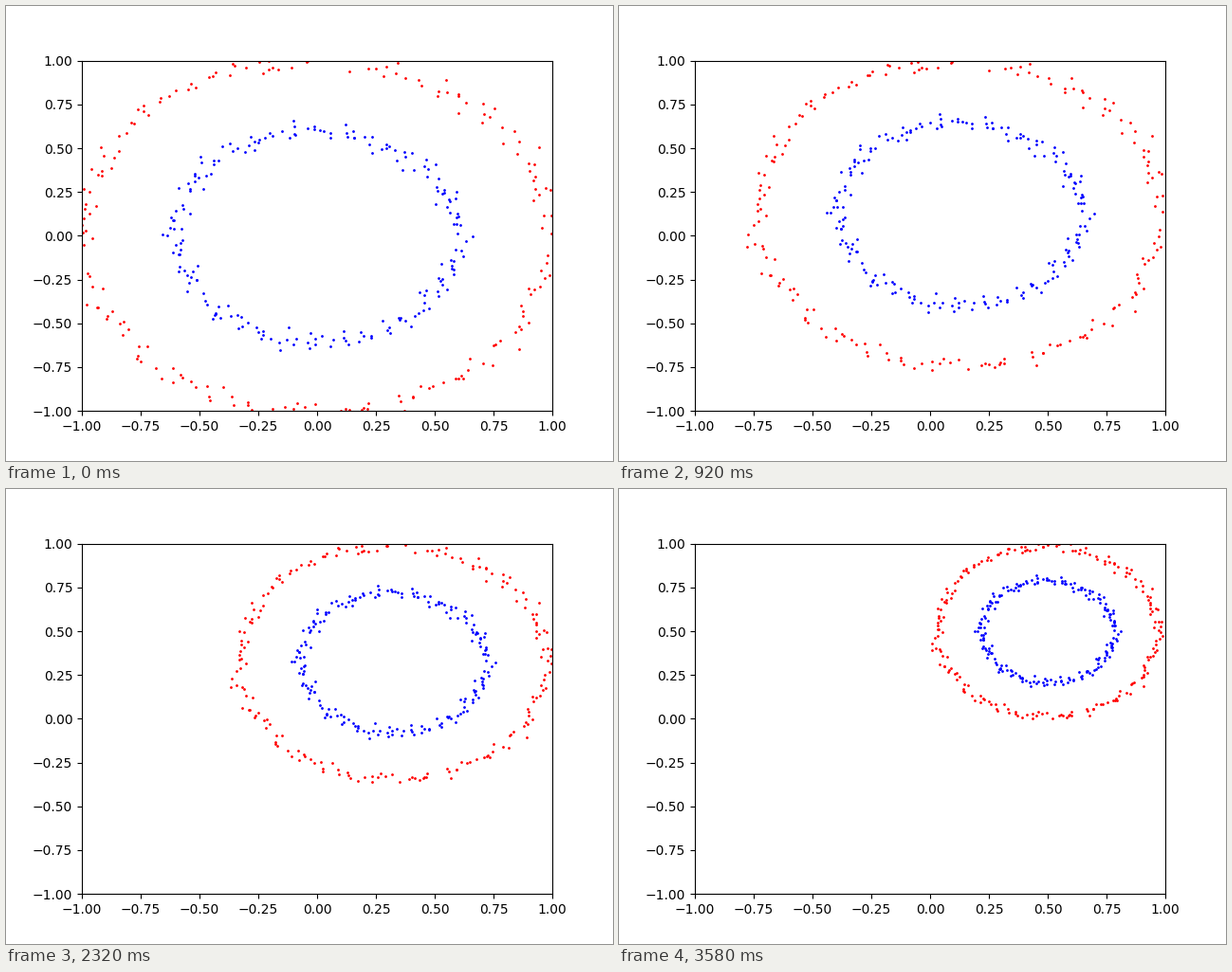
A matplotlib script for the animation above (3600 ms loop, 640 by 480 pixels).

```python
import numpy as np
import matplotlib.pyplot as plt
from matplotlib.animation import FuncAnimation

FRAMES = 180
POINTS = 200
NOISE = 0.03

# Data limits used for the min-max scaling to [0, 1]
LOW = np.array([-1.063, -1.034])
HIGH = np.array([1.060, 1.035])


def circle(radius):
    angle = np.linspace(0, 2 * np.pi, POINTS, endpoint=False)
    return radius * np.column_stack([np.cos(angle), np.sin(angle)])


def make_circles(seed):
    """Two noisy concentric rings, shuffled, with a mask for the outer one."""
    rng = np.random.RandomState(seed)
    points = np.vstack([circle(1.0), circle(0.6)])
    order = np.arange(2 * POINTS)
    rng.shuffle(order)
    points = points[order] + rng.normal(scale=NOISE, size=points.shape)
    return np.clip(points, LOW, HIGH), order < POINTS


points, is_outer = make_circles(seed=0)
scaled = (points - LOW) / (HIGH - LOW)

fig, ax = plt.subplots(figsize=(6.4, 4.8), dpi=100)
ax.set_xlim(-1, 1)
ax.set_ylim(-1, 1)
outer_dots, = ax.plot([], [], "o", color="red", markersize=1)
inner_dots, = ax.plot([], [], "o", color="blue", markersize=1)


def update(frame):
    t = frame / (FRAMES - 1)
    now = (1 - t) * points + t * scaled
    outer_dots.set_data(*now[is_outer].T)
    inner_dots.set_data(*now[~is_outer].T)
    return outer_dots, inner_dots


anim = FuncAnimation(fig, update, frames=FRAMES, interval=20, repeat=True)
plt.show()
```
